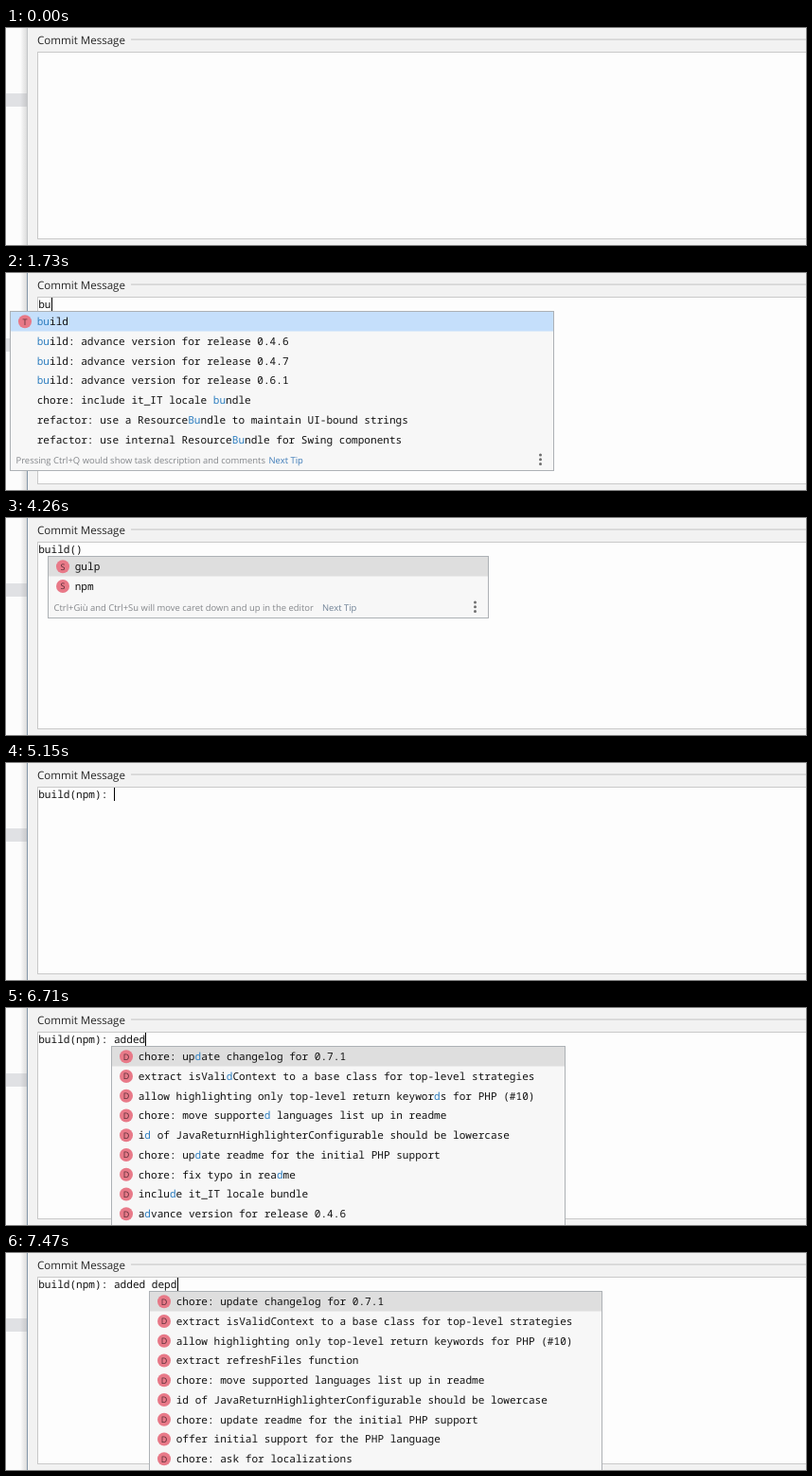
Recreate the animation shown at these times as an HTML page. Size 845x229 px, loop 7.99 s.

```html
<!DOCTYPE html>
<html lang="en">
<head>
<meta charset="utf-8">
<title>Commit message completion</title>
<style>
  html, body { margin: 0; width: 100%; height: 100%; overflow: hidden; background: #fcfcfc; }
  svg { display: block; width: 845px; height: 229px; }
  text { white-space: pre; text-rendering: geometricPrecision; }
  .mono { font: 11.08px "Noto Sans Mono", "DejaVu Sans Mono", monospace; fill: #111; }
  .ui { font: 11.55px "Open Sans", "Noto Sans", sans-serif; fill: #262626; }
  .hint { font: 9.45px "Open Sans", "Noto Sans", sans-serif; fill: #84878b; }
  .icon { font: 9px "Open Sans", "Noto Sans", sans-serif; fill: #542a33; text-anchor: middle; }
  .hit { fill: #2f7fc0; }
</style>
</head>
<body>
<svg viewBox="0 0 845 229">
  <defs>
    <linearGradient id="shade">
      <stop offset="0" stop-color="#888" stop-opacity="0"/>
      <stop offset="1" stop-color="#888" stop-opacity=".28"/>
    </linearGradient>
  </defs>
  <rect width="845" height="229" fill="#fcfcfc"/>
  <rect y="69" width="22" height="14" fill="#e0e1e4"/>
  <rect x="15" width="7" height="229" fill="url(#shade)"/>
  <rect x="22" width="823" height="229" fill="#f2f2f2"/>
  <rect x="22" width="1" height="229" fill="#c3c5c7"/>
  <rect id="edge" x="22" width="1" height="229" fill="#8496a8"/>
  <text class="ui" x="33" y="16.6">Commit Message</text>
  <rect x="132" y="11.5" width="713" height="1.2" fill="#cbcbcb"/>
  <rect x="33.5" y="25.5" width="830" height="197" fill="#fdfdfd" stroke="#c9c9c9"/>
  <text class="mono" id="line" x="34.2" y="37"></text>
  <rect id="caret" y="26" width="1" height="14" fill="#000"/>
  <g id="popup"></g>
</svg>
<script>
const LOOP = 7990, CHAR = 6.65, ROW = 20.75, TOP = 41;
const $ = id => document.getElementById(id);

const types = ["refactor", "fix", "feat", "build", "style", "test", "docs", "perf", "chore"];
const versions = ["0.4.6", "0.4.7", "0.6.1"].map(v => "advance version for release " + v);
const base = "extract isValidContext to a base class for top-level strategies";
const config = "id of JavaReturnHighlighterConfigurable should be lowercase";

const lists = {
  T: [
    ...types,
    ...versions.map(v => "build: " + v),
    "chore: include it_IT locale bundle",
    "refactor: use a ResourceBundle to maintain UI-bound strings",
    "refactor: use internal ResourceBundle for Swing components",
    base, config
  ],
  S: ["gulp", "npm"],
  D: [
    "chore: update changelog for 0.7.1",
    base,
    "allow highlighting only top-level return keywords for PHP (#10)",
    "extract refreshFiles function",
    "chore: move supported languages list up in readme",
    config,
    "chore: update readme for the initial PHP support",
    "offer initial support for the PHP language",
    "chore: ask for localizations",
    "explain Java simple getters with a tooltip",
    "explain JavaScript simple getters with a tooltip",
    "chore: fix typo in readme",
    "include it_IT locale bundle",
    ...versions
  ]
};
const tips = {
  T: ["Pressing Ctrl+Q would show task description and comments", "#3f7cb8", 6.5, 273.5],
  S: ["Ctrl+Giù and Ctrl+Su will move caret down and up in the editor", "#6f8195", 6.5, 290],
  D: ["Pressing Ctrl+Q would show task description and comments", "#6f8195", 6.5, 273.5]
};

const pop = (kind, at, width, prefix = "", pick = 0, active = kind === "T") =>
  ({ kind, at, width, prefix, pick, active });
const npm = "build(npm): ";

// [time, text, caret column (-1 hides it), popup]
const steps = [
  [0, "", -1],
  [380, "", 0],
  [610, "", 0, pop("T", 0, 560)],
  [790, "", -1, pop("T", 0, 560)],
  [1280, "", 0, pop("T", 0, 560)],
  [1430, "b", 1, pop("T", 0, 560, "b")],
  [1730, "bu", 2, pop("T", 0, 575, "bu")],
  [1790, "bui", 3, pop("T", 0, 575, "bui")],
  [2270, "build", 5],
  [3330, "build()", 6, pop("S", 6, 466)],
  [4260, "build()", -1, pop("S", 6, 466)],
  [4640, "build()", -1, pop("S", 6, 466, "", 1, true)],
  [4820, "build()", 6, pop("S", 6, 466, "", 1, true)],
  [5150, npm, 12],
  [5190, npm, 12, pop("D", 12, 480)],
  [5820, npm, -1, pop("D", 12, 480)],
  [5970, npm + "a", 13, pop("D", 12, 480, "a")],
  [6160, npm + "ad", 14, pop("D", 12, 480, "ad")],
  [6260, npm + "add", 15],
  [6440, npm + "adde", 16, pop("D", 16, 480)],
  [6710, npm + "added", 17, pop("D", 16, 480, "d")],
  [6980, npm + "added ", 18],
  [7010, npm + "added d", 19, pop("D", 19, 480)],
  [7160, npm + "added de", 20, pop("D", 19, 480, "e")],
  [7260, npm + "added dep", 21],
  [7440, npm + "added depd", 22],
  [7470, npm + "added depd", 22, pop("D", 22, 479)]
];

const find = (item, prefix) => item.toLowerCase().indexOf(prefix);

// Matches at the start of an item come first, the rest keep their order.
function matches({ kind, prefix }) {
  const found = lists[kind].filter(item => find(item, prefix) >= 0);
  const leads = item => find(item, prefix) === 0;
  return [...found.filter(leads), ...found.filter(item => !leads(item))];
}

function marked(item, prefix) {
  if (!prefix) return item;
  const from = find(item, prefix), to = from + prefix.length;
  return `${item.slice(0, from)}<tspan class="hit">${item.slice(from, to)}</tspan>${item.slice(to)}`;
}

function rowSvg(item, i, x, p) {
  const y = TOP + i * ROW;
  let out = "";
  if (i === p.pick) {
    out += `<rect x="${x + 1}" y="${y}" width="${p.width - 2}" height="20.5" fill="${p.active ? "#c5dffb" : "#dedede"}"/>`;
  }
  if (p.kind !== "T" || types.includes(item)) {
    out += `<circle cx="${x + 16}" cy="${y + 10.3}" r="7" fill="#e87988"/>` +
      `<text class="icon" x="${x + 16}" y="${y + 13.6}">${p.kind}</text>`;
  }
  return out + `<text class="mono" x="${x + 28.7}" y="${y + 14}">${marked(item, p.prefix)}</text>`;
}

function popupSvg(p) {
  if (!p) return "";
  const x = Math.round(4.4 + p.at * CHAR);
  const items = matches(p);
  const height = Math.round(items.length * ROW + 23);
  const bottom = TOP + height;
  const [tip, color, tipX, nextX] = tips[p.kind];
  const dots = [-17, -12.3, -7.6].map(dy =>
    `<circle cx="${x + p.width - 14.5}" cy="${bottom + dy}" r="1.5" fill="#6e6e6e"/>`).join("");
  return `<rect x="${x + .5}" y="${TOP - .5}" width="${p.width - 1}" height="${height}" fill="#f7f7f7" stroke="#adb1b5"/>` +
    items.slice(0, 10).map((item, i) => rowSvg(item, i, x, p)).join("") +
    `<text class="hint" x="${x + tipX}" y="${bottom - 8.5}">${tip}</text>` +
    `<text class="hint" x="${x + nextX}" y="${bottom - 8.5}" style="fill:${color}">Next Tip</text>` + dots;
}

let shown = -1;
function draw(now) {
  const t = now % LOOP;
  // The window edge gains its focus tint in five steps.
  const tint = t < 110 ? 0 : Math.min(5, 1 + Math.floor((t - 110) / 67.5)) / 5;
  $("edge").setAttribute("opacity", tint);

  let index = steps.length - 1;
  while (steps[index][0] > t) index--;
  if (index !== shown) {
    const [, text, column, popup] = steps[index];
    $("line").textContent = text;
    $("caret").setAttribute("x", Math.round(34.3 + column * CHAR));
    $("caret").setAttribute("opacity", column < 0 ? 0 : 1);
    $("popup").innerHTML = popupSvg(popup);
    shown = index;
  }
}

const start = performance.now();
function tick() {
  draw(performance.now() - start);
  requestAnimationFrame(tick);
}
tick();
</script>
</body>
</html>
```
